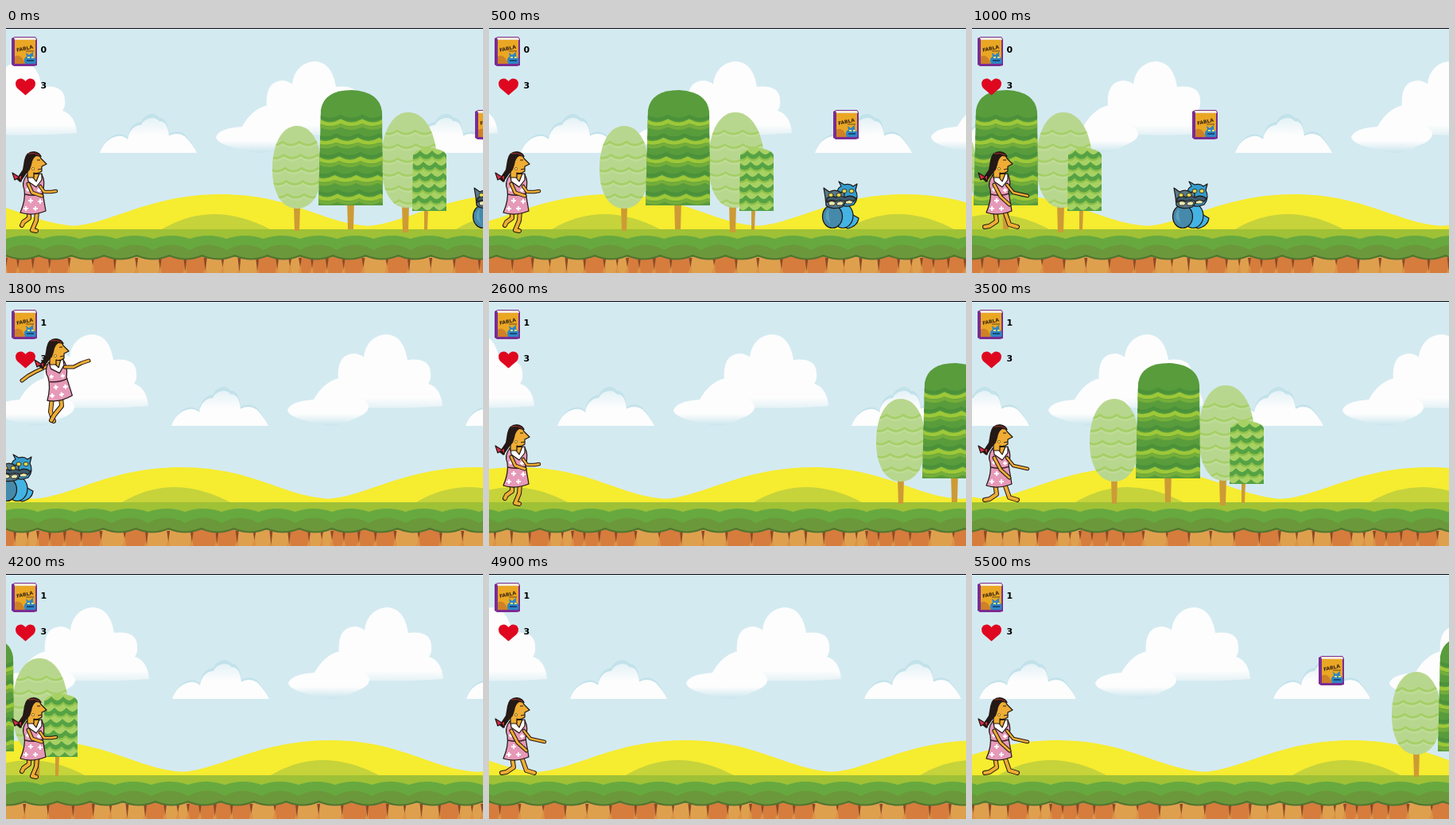
An HTML page for the animation above (5.6 s loop, 600 by 308 pixels).

```html
<!DOCTYPE html>
<html lang="en">
<head>
<meta charset="utf-8">
<title>Runner</title>
<style>
  html, body { margin: 0; width: 100%; height: 100%; overflow: hidden; background: #d4eaf1; }
  svg { display: block; width: 600px; height: 308px; }
  text { font: bold 11px "DejaVu Sans", sans-serif; }
  .ink { stroke: #1d1410; stroke-width: 1.2; stroke-linejoin: round; }
  .limb { fill: none; stroke-linecap: round; stroke-linejoin: round; }
</style>
</head>
<body>
<svg viewBox="0 0 600 308">
  <defs>
    <linearGradient id="puff" x2="0" y2="1">
      <stop offset=".86" stop-color="#fdfdfd"/>
      <stop offset="1" stop-color="#fdfdfd" stop-opacity=".4"/>
    </linearGradient>
    <linearGradient id="wisp" x2="0" y2="1">
      <stop offset="0" stop-color="#e4f2f6"/>
      <stop offset=".5" stop-color="#fdfdfd"/>
    </linearGradient>
    <linearGradient id="tail" x2="0" y2="1">
      <stop offset=".75" stop-color="#fdfdfd"/>
      <stop offset="1" stop-color="#c9e5ed"/>
    </linearGradient>

    <path id="small" d="M118 157C122 145 128 137 139 134Q147 132 153 138C155 124 163 118 170 118C174 108 187 104 193 113Q203 112 205 133Q216 127 225 134Q235 145 240 157Z"/>
    <g id="cloud">
      <use href="#small" fill="#c2e2ea"/>
      <use href="#small" fill="url(#wisp)" transform="matrix(1 0 0 .9 0 15.7)"/>
      <path fill="url(#puff)" d="M322 132Q314 122 328 100Q325 66 349 66Q358 68 360 71C362 51 376 42 389 42C404 43 412 55 415 74Q444 71 444 91Q445 99 441 104Q457 109 459 132Q395 137 322 132Z"/>
      <path fill="url(#tail)" d="M264 137Q268 126 297 124Q309 102 329 97L364 128Q372 139 348 148Q325 162 302 154Q265 147 264 137Z"/>
    </g>

    <g id="hill">
      <path fill="#f6ec30" d="M82 254V249C131 247 180 209 270 209S398 246 458 249V254Z"/>
      <path fill="#c6d33b" d="M196 253Q228 234 262 234T332 253Z"/>
    </g>

    <g id="book">
      <path fill="#7a2c92" d="M0 2L4 0H30L32 3V36L28 37H3L0 35Z"/>
      <path fill="#f3e9d8" d="M3 1H30L31 4H4Z"/>
      <path fill="#eaa724" d="M4 4H30V34H4Z"/>
      <path fill="#cf8126" d="M4 25Q12 20 17 34H4Z"/>
      <text x="6" y="17" transform="rotate(-12 16 15)" style="font-size:6px" fill="#3a2413">FABLA</text>
      <path stroke="#6b4a20" d="M18 18H28"/>
      <path fill="#2f86c4" d="M17 34Q14 27 19 25L18 20L22 23L27 19V24Q32 28 30 34Z"/>
      <path fill="#174a7d" d="M19 29H28V31H19Z"/>
      <path fill="#e8df72" d="M20 25H23V27H20ZM25 25H28V27H25Z"/>
    </g>

    <g id="monster">
      <path class="ink" fill="#43b3e4" d="M28 57Q41 52 37 41L46 46Q45 56 32 59Z"/>
      <ellipse class="ink" cx="26" cy="43" rx="13" ry="15.500" fill="#43b3e4"/>
      <path class="ink" fill="#349dce" d="M19 15Q19 8 24 6L21 0L28 4Q35 2 39 6L44 3L42 11Q47 20 40 29Q29 34 20 27Z"/>
      <ellipse class="ink" cx="13" cy="44" rx="12.500" ry="14.500" fill="#4589ab"/>
      <path fill="#5b9fbd" d="M5 47Q3 39 9 34Q7 44 11 54Z"/>
      <path class="ink" fill="#55798b" d="M4 20L2 8L9 13Q17 9 24 14L28 10L28 19Q32 26 25 32Q12 36 5 30Z"/>
      <path class="ink" fill="#3c5a6b" d="M6 21Q12 17 17 20Q22 17 29 20Q35 16 43 21L40 25Q34 22 29 25Q23 22 17 25Q11 22 6 26Z"/>
      <path fill="#eceab0" stroke="#1d1410" stroke-width=".8" d="M8 26Q13 23 17 27L15 30H9ZM18 27Q24 23 27 27L25 30H19ZM29 25Q35 22 39 25L37 28H30Z"/>
      <g fill="#e9dc4d" stroke="#1d1410" stroke-width=".8">
        <ellipse cx="11" cy="17" rx="3" ry="2.500"/><ellipse cx="21" cy="17" rx="3" ry="2.500"/>
        <ellipse cx="28" cy="12" rx="3" ry="2.500"/><ellipse cx="37" cy="12" rx="3" ry="2.500"/>
      </g>
    </g>

    <g id="head">
      <path class="ink" fill="#efad35" d="M29 159Q41 155 44 164L51 171L45 174L45 180Q40 184 35 182L35 188H27V172Z"/>
      <path fill="#241915" d="M23 166Q25 155 35 155Q43 156 45 162L38 161Q33 164 32 172L30 178L25 184L18 194L13 190L21 178Q22 172 23 166Z"/>
      <path fill="none" stroke="#a8352c" d="M28 158Q36 156 42 160"/>
      <path class="ink" fill="#d82f48" d="M16 187L8 182L11 191L16 188L19 193L20 184Z"/>
      <path fill="none" stroke="#241915" d="M39 166H43M40 178L45 177"/>
      <circle cx="34" cy="177" r="1.600" fill="#f6df6c" stroke="#5e3b15" stroke-width=".6"/>
    </g>
    <g id="dress">
      <path class="ink" fill="#e699b8" d="M26 185L45 184Q50 193 46 206L50 230Q33 237 18 232Q25 216 23 203Q19 195 26 185Z"/>
      <path class="ink" fill="#fff" d="M27 185L45 183L45 191L38 200L28 193Z"/>
      <path class="ink" fill="#efad35" d="M31 184L42 183L38 193Z"/>
      <path fill="none" stroke="#3b2024" stroke-width="1.500" d="M24 209Q36 212 47 208"/>
      <path fill="none" stroke="#fff" stroke-width="2" d="M25 203h5m-2.500 -2.500v5M39 204h5m-2.500 -2.500v5M28 217h6m-3 -3v6M40 218h6m-3 -3v6M22 227h6m-3 -3v6M34 227h6m-3 -3v6"/>
    </g>
  </defs>

  <rect width="600" height="308" fill="#d4eaf1"/>
  <g id="clouds"></g>
  <g id="hills"></g>
  <g id="ground"></g>
  <g id="trees"></g>
  <rect width="600" height="1" fill="#08080d"/>
  <use href="#book" x="7" y="11"/>
  <path fill="#df0720" d="M24.500 84.500L14 75.500Q10 70 14 65Q20 61 24.500 67Q29 61 35 65Q39 70 35 75.500Z"/>
  <text id="score" x="43.500" y="31">0</text>
  <text x="43.500" y="76">3</text>
  <use id="item" href="#book" y="103"/>
  <use id="enemy" href="#monster" y="193"/>
  <g id="player"></g>
</svg>
<script>
const $ = id => document.getElementById(id);
const TILE = 370, GROVE = 1157, STEP = 100, STEPS = 56;

// [step, distance]: the running speed varies slightly
const pace = [[0, 0], [10, 78.3], [18, 140], [26, 201], [35, 268.8], [42, 324.3], [55, 424.3]];

let seed = 7;
const random = () => (seed = seed * 16807 % 2147483647) / 2147483647;

const path = (d, attrs) => `<path d="${d}" ${attrs}/>`;
const scallops = (x, end, y, width, depth) => {
  let d = `M${x} ${y}`;
  for (; x < end; x += width) d += `q${width / 2} ${depth} ${width} 0`;
  return d;
};

function tree(id, crown, trunk, fill, [x, right, top, bottom, gap, width], bands) {
  const art = path(trunk, 'fill="#cd9b35"') + path(crown, `fill="${fill}"`);
  let stripes = '';
  for (let y = top; y < bottom; y += gap)
    for (const [dy, color, weight] of bands)
      stripes += path(scallops(x - (y % 9), right, y + dy, width, 8),
        `fill="none" stroke="${color}" stroke-width="${weight}"`);
  return `<clipPath id="${id}">${path(crown, '')}</clipPath>${art}<g clip-path="url(#${id})">${stripes}</g>`;
}

const pale = [[3, '#c0dc98', 2], [0, '#a5cf66', 2.5]];
const grove =
  tree('oval', 'M366 123C386 123 397 148 397 177S386 227 366 227S335 206 335 177S346 123 366 123Z',
    'M362 224H370L369 255H363Z', '#b8d78e', [335, 399, 143, 224, 16.5, 21], pale) +
  tree('tall', 'M506 106C529 106 542 136 542 168S526 226 504 226S472 200 472 168S483 106 506 106Z',
    'M498 222H507L506 257H499Z', '#b8d78e', [472, 544, 129, 224, 17.5, 23], pale) +
  tree('main', 'M396 103Q400 78 435 78Q470 80 473 105L474 223H393Z',
    'M429 216H438L437 253H430Z', '#589c3c', [394, 476, 117, 223, 23.5, 27],
    [[-6, '#4b913a', 4], [5, '#74ad3a', 4], [0, '#9dc838', 4.5]]) +
  tree('bush', 'M512 160Q516 151 533 151Q551 152 554 160V230H511Z',
    'M526 228H531L530 254H526Z', '#a8d163', [511, 556, 158, 230, 14, 15],
    [[0, '#55a244', 5.5], [4, '#8fc24a', 2]]);

function groundTile() {
  let art = '<rect y="253" width="370" height="55" fill="#9fc136"/>';
  art += path(scallops(0, TILE, 265, TILE / 8, -8) + 'V308H0Z', 'fill="#67a93f"');
  art += path(scallops(0, TILE, 279, TILE / 8, -13) + 'V308H0Z', 'fill="#6b983b"');
  art += path('M0 288H370V308H0Z', 'fill="#dc9247"');
  for (let x = 0; x < TILE;) {
    const w = Math.min(15 + random() * 18, TILE - x);
    const shade = random() < .6 ? '#dfa04e' : '#d67c3d';
    art += path(`M${x} 288H${x + w}L${x + w - 1} 302L${x + w - 3} 308H${x + 2}L${x + 1} 300Z`, `fill="${shade}"`);
    art += path(`M${x - 2} 289L${x} ${298 + random() * 9}L${x + 2} 289Z`, 'fill="#8b4a27"');
    x += w;
  }
  const edge = scallops(0, TILE, 286, TILE / 9, 9);
  return art + path(edge + 'V283H0Z', 'fill="#6b983b"') + path(edge, 'fill="none" stroke="#52742f" stroke-width="2"');
}

const repeat = (art, period, from, to) => {
  let out = '';
  for (let k = from; k <= to; k++) out += `<g transform="translate(${k * period})">${art}</g>`;
  return out;
};
$('clouds').innerHTML = repeat('<use href="#cloud"/>', TILE, -1, 2);
$('hills').innerHTML = '<rect x="-400" y="249" width="1600" height="5" fill="#f6ec30"/>' +
  repeat('<use href="#hill"/>', TILE, -1, 2);
$('ground').innerHTML = repeat(groundTile(), TILE, 0, 2);
$('trees').innerHTML = repeat(grove, GROVE, 0, 2);

const limb = (d, width = 4) =>
  path(d, `class="limb" stroke="#1d1410" stroke-width="${width + 2}"`) +
  path(d, `class="limb" stroke="#efad35" stroke-width="${width}"`);
const body = '<use href="#dress"/><use href="#head"/>';
const poses = {
  upright: limb('M29 229L29 239L22 244L20 248') + limb('M39 230L38 242L33 254L38 255') +
    body + limb('M28 196L33 207L45 211', 3) + limb('M43 199L48 206L57 206L63 205', 2.5),
  stride: limb('M29 229L31 243L22 249L16 250') + limb('M41 230L47 247L57 250') +
    body + limb('M28 197L36 212L47 222', 3) + limb('M44 197L52 207L61 209L70 211', 2.5),
  leap: limb('M58 121L56 139L60 151') + limb('M69 121L70 132L61 143L57 150') +
    limb('M54 81L37 89L28 94L20 100', 3) +
    '<use href="#dress" transform="translate(30 -109) rotate(-8 35 205)"/>' +
    '<use href="#head" transform="translate(28 -108)"/>' + limb('M74 83L85 83L95 78L104 75', 3)
};
for (const name in poses) $('player').innerHTML += `<g id="${name}">${poses[name]}</g>`;

function distance(step) {
  const i = Math.max(1, pace.findIndex(([at]) => at >= step));
  const [a, from] = pace[i - 1], [b, to] = pace[i];
  return from + (to - from) * (step - a) / (b - a);
}

const move = (id, x, y = 0) => $(id).setAttribute('transform', `translate(${Math.round(x)} ${Math.round(y)})`);

function draw(step) {
  const run = distance(step);
  move('clouds', -(run * 2 % TILE));
  move('hills', -(run * 3 % TILE));
  move('ground', -(run * 5 % TILE));
  move('trees', -run * 5);
  move('enemy', 587 - run * 4.28);

  const collected = step >= 16;
  move('item', (collected ? 2133 : 590) - run * 4);
  $('score').textContent = collected ? 1 : 0;

  const airborne = step > 14 && step < 22;
  const stride = step < 14 ? Math.floor(step / 1.1) % 2 : step % 2;
  const pose = airborne ? 'leap' : stride ? 'stride' : 'upright';
  for (const name in poses) $(name).style.display = name === pose ? '' : 'none';
  move('player', 0, airborne ? 110 * ((step - 18) / 4) ** 2 : 0);
}

const start = performance.now();
let shown = -1;
function tick() {
  const step = Math.floor((performance.now() - start) / STEP) % STEPS;
  if (step !== shown) draw(shown = step);
  requestAnimationFrame(tick);
}
tick();
</script>
</body>
</html>
```
